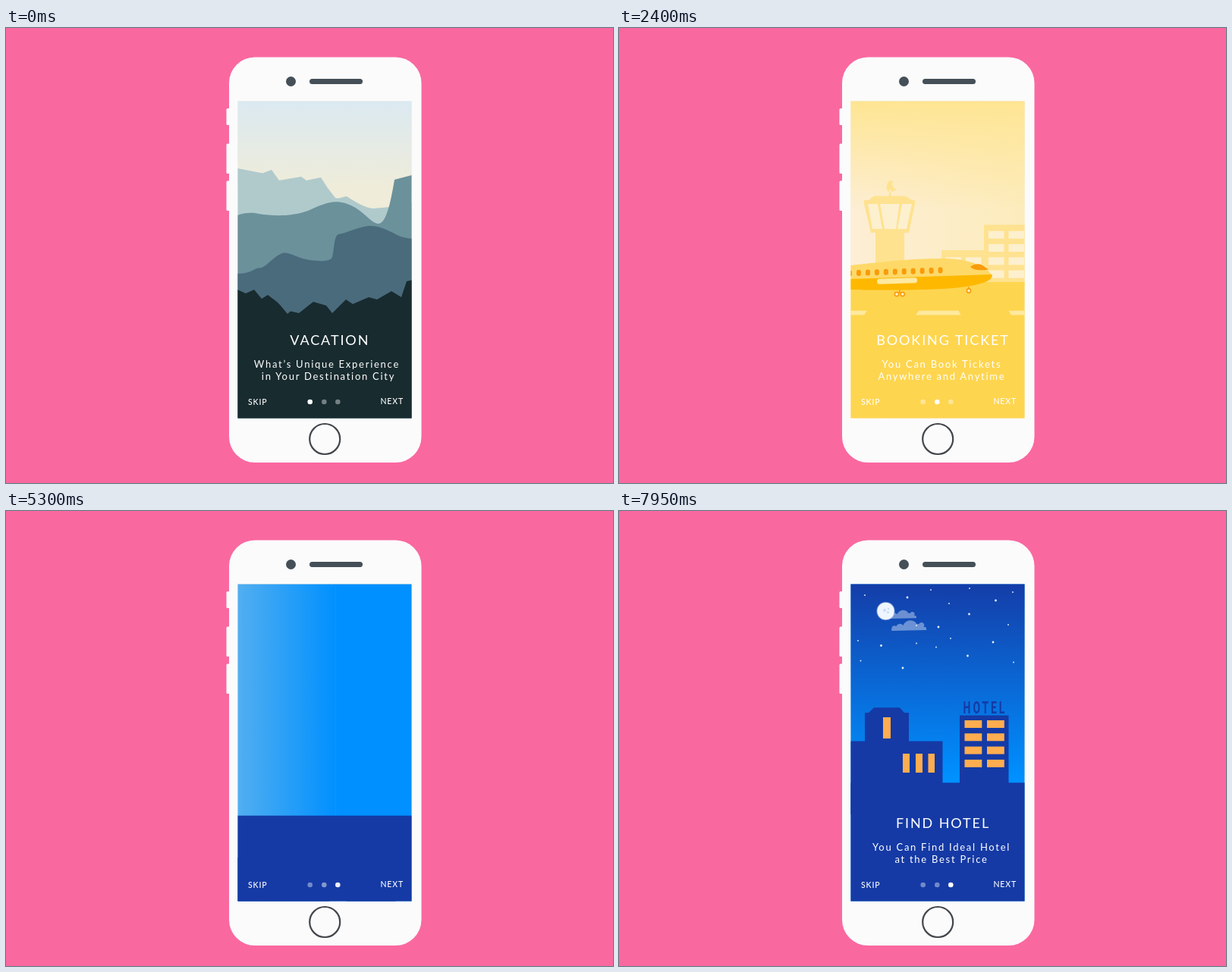
An HTML page for the animation above (8000 ms loop, 800 by 600 pixels).

```html
<!DOCTYPE html>
<html lang="en">
<head>
<meta charset="utf-8">
<title>Travel onboarding</title>
<style>
  html, body { margin: 0; width: 100%; height: 100%; overflow: hidden; background: #fa68a0; }
  svg { display: block; width: 800px; height: 600px; }
  text { font-family: Lato, "Open Sans", sans-serif; fill: #fff; }
  .title { font-size: 18px; letter-spacing: 1.9px; text-anchor: middle; }
  .sub { font-size: 13px; letter-spacing: 1.73px; text-anchor: middle; }
  .nav { font-size: 10.5px; font-weight: 500; letter-spacing: .85px; }
  .sign { font: 700 22.5px Roboto, sans-serif; letter-spacing: 4.75px; fill: #153aa5; }
</style>
</head>
<body>
<svg viewBox="0 0 800 600">
  <defs>
    <clipPath id="screen"><rect x="305.5" y="96.5" width="229" height="418"/></clipPath>
    <linearGradient id="dawn" x2="0" y2="1">
      <stop stop-color="#dbe9f1"/><stop offset="1" stop-color="#efecd9"/>
    </linearGradient>
    <linearGradient id="sand">
      <stop stop-color="#fdeed5" stop-opacity="0"/><stop offset=".57" stop-color="#fdeed5"/>
      <stop offset="1" stop-color="#fcecbc"/>
    </linearGradient>
    <linearGradient id="sun" x2="0" y2="1">
      <stop stop-color="#fee593"/><stop offset="1" stop-color="#fee593" stop-opacity="0"/>
    </linearGradient>
    <linearGradient id="azure">
      <stop stop-color="#0090ff" stop-opacity="0"/><stop offset="1" stop-color="#0090ff"/>
    </linearGradient>
    <linearGradient id="dusk" x2="0" y2="1">
      <stop stop-color="#143da8"/><stop offset="1" stop-color="#143da8" stop-opacity="0"/>
    </linearGradient>
    <path id="cloud" d="M0 14C-1 9 2 6 6 8C8 4 13 4 15 7C18-1 29-2 33 5L36 5C37 2 43 2 43 7L42 9L45 9L46 13Z"/>
  </defs>

  <rect width="800" height="600" fill="#fa68a0"/>
  <g fill="#fbfbfb">
    <rect x="290.5" y="106" width="8" height="22" rx="1.5"/>
    <rect x="290.5" y="152.5" width="8" height="39.5" rx="1.5"/>
    <rect x="290.5" y="201.5" width="8" height="39.5" rx="1.5"/>
    <rect x="294" y="38.5" width="253.5" height="534.5" rx="34"/>
  </g>
  <circle cx="375.5" cy="70.5" r="6.5" fill="#454f57"/>
  <rect x="400" y="67" width="70" height="7" rx="3.5" fill="#454f57"/>
  <circle cx="420.2" cy="542" r="20" fill="none" stroke="#42474c" stroke-width="2.2"/>

  <g clip-path="url(#screen)">
    <!-- skies -->
    <rect x="305" y="96" width="230" height="420" fill="#efecd9"/>
    <rect x="305" y="96" width="230" height="115" fill="url(#dawn)"/>
    <g id="sandSky">
      <rect y="96" width="535" height="420" fill="url(#sand)"/>
    </g>
    <rect id="sunTop" x="305" y="96" width="230" height="145" fill="url(#sun)"/>
    <g id="blueSky">
      <rect y="96" width="400" height="420" fill="url(#azure)"/>
      <rect x="399.5" y="96" width="300" height="420" fill="#0090ff"/>
    </g>
    <rect id="duskTop" x="305" y="96" width="230" height="255" fill="url(#dusk)"/>

    <!-- mountains -->
    <path id="ridge1" fill="#b0cacc" d="M305 185L338 191.5L350 187L360 201L389 196L396 201L415 197L424 211L434 224C440 226 444 222 449 222C460 229 475 238 484 238L506 236L535 230V600H305Z"/>
    <path id="ridge2" fill="#6b919b" d="M305 247C315 243 325 243 333 245C352 248 375 249 398 241C418 232 430 226 447 231C470 238 480 257 490 258C500 259 506 236 512 200L535 194V600H305Z"/>
    <path id="ridge3" fill="#4a6b7c" d="M305 324C320 324 325 319 332 316.5C342 318 350 303 362 298C372 293 380 303 400 306C415 308 428 308 430 302C433 290 432 275 438 272C450 270 455 266 468 263C485 258 495 263 510 270C520 276 528 277 535 278V600H305Z"/>
    <path id="ridge4" fill="#182b2f" d="M305 345L316 350L327 345L337 357L345 352L357 361L361 365L371 377L375 373.5L386 376L405 361L422 366L430 376L448 358L457 364L478 355L489 358L508 347L521 355L528 334L535 332.5V600H305Z"/>

    <!-- airport -->
    <g id="airport">
      <g id="tower" fill="#fee28f">
        <path d="M356 222V213H358.500V222ZM357 201C351 206 351 214 357 217L367 213C361 212 359 207 361 202Z"/>
        <path d="M323 227L329 227L336 221.500H378L386 227H390V232L382 270H332L323 232Z"/>
        <rect x="338" y="269" width="38" height="70"/>
        <path fill="#fdf0cf" d="M328 232H341L347 265H334ZM344 232H369.500L365 265H350ZM373 232H386L379 265H367Z"/>
      </g>
      <g id="terminal" fill="#fee28f">
        <rect x="425" y="293" width="57" height="50"/>
        <rect x="481" y="259.500" width="56" height="80"/>
        <g id="terminalGlass" fill="#fdf0cf"></g>
      </g>
      <rect x="305" y="335" width="230" height="300" fill="#fed54f"/>
      <path fill="#feea9e" d="M305 372.700H327L323 378.500H305ZM395.500 372.700H447.500L450.500 378.500H391ZM513.500 372.700H536V378.500H517Z"/>
    </g>
    <g id="plane">
      <path fill="#fed968" d="M180 320L305 313C340 309 385 304 425 304C455 304 470 310 480 316C488 321 492 325 492 328L440 336H180Z"/>
      <path fill="#feb800" d="M180 333L305 331L491.500 325C494 335 470 340 440 343C400 346 340 346 305 345L180 343Z"/>
      <path fill="#f99c0a" d="M463 315C467 311 475 310 479 313L487 318.500C478 320 468 320 463 315Z"/>
      <g id="portholes" fill="#f99c0a"></g>
      <rect x="340" y="330" width="53" height="7" rx="3.300" fill="#fee9a0" transform="rotate(-1.700 366 333)"/>
      <path stroke="#f99c0a" stroke-width="1.500" d="M370 345V350M461 341V346"/>
      <g fill="#fff3d0" stroke="#f99c0a" stroke-width="1.600">
        <circle cx="366" cy="351" r="2.600"/><circle cx="373.700" cy="351" r="2.600"/><circle cx="461" cy="346.500" r="2.600"/>
      </g>
    </g>

    <!-- night city -->
    <g id="stars" fill="#fff"></g>
    <use id="cloudA" href="#cloud" y="144" fill="#fff" fill-opacity=".38"/>
    <g id="cloudB"><use href="#cloud" transform="translate(0 130.500) scale(.83)" fill="#fff" fill-opacity=".38"/></g>
    <g id="moon">
      <circle cx="351.500" cy="132" r="12.200" fill="#fff" opacity=".35"/>
      <circle cx="351.500" cy="132" r="11.200" fill="#f0f6ff"/>
      <g fill="#c6ddfa"><circle cx="350" cy="131" r="2"/><circle cx="355" cy="129" r="1.300"/><circle cx="354.500" cy="133.500" r="1.600"/></g>
    </g>
    <g id="city" fill="#153aa5">
      <g id="block">
        <path d="M300 303.500H324V266H329L336 259.300H370L376 266H382V303.500H426.500V400H300Z"/>
        <path fill="#ffad4f" d="M348 272H358V300H348ZM374 320H383V345H374ZM391 320H400V345H391ZM407.500 320H416V345H407.500Z"/>
      </g>
      <g id="hotel">
        <text class="sign" transform="translate(453.600 267) scale(.62 1)">HOTEL</text>
        <rect x="449" y="269.500" width="64.500" height="130"/>
        <g id="hotelGlass" fill="#ffad4f"></g>
      </g>
      <rect x="305" y="358.300" width="230" height="300"/>
    </g>

    <!-- copy -->
    <g id="title1"><text class="title" x="426.800" y="417.500">VACATION</text></g>
    <g id="sub1"><text class="sub" x="422.900" y="448">What’s Unique Experience</text><text class="sub" x="425" y="463.700">in Your Destination City</text></g>
    <g id="title2"><text class="title" x="427" y="417.500">BOOKING TICKET</text></g>
    <g id="sub2"><text class="sub" x="425.400" y="448">You Can Book Tickets</text><text class="sub" x="425.400" y="463.700">Anywhere and Anytime</text></g>
    <g id="title3"><text class="title" x="427" y="417.500">FIND HOTEL</text></g>
    <g id="sub3"><text class="sub" x="425" y="448">You Can Find Ideal Hotel</text><text class="sub" x="425" y="463.700">at the Best Price</text></g>

    <text class="nav" x="319" y="496.900">SKIP</text>
    <text class="nav" x="493.400" y="496.300">NEXT</text>
    <g fill="#fff">
      <circle id="dot1" cx="400.700" cy="493" r="3.300"/>
      <circle id="dot2" cx="419.300" cy="493" r="3.300"/>
      <circle id="dot3" cx="437.300" cy="493" r="3.300"/>
    </g>
  </g>
</svg>

<script>
const LOOP = 8000, STEP = 50;
const $ = id => document.getElementById(id);

function add(parent, tag, attrs) {
  const el = document.createElementNS('http://www.w3.org/2000/svg', tag);
  for (const k in attrs) el.setAttribute(k, attrs[k]);
  return $(parent).appendChild(el);
}

function glass(parent, cols, top, rows, width) {
  for (const x of cols)
    for (let r = 0; r < rows; r++)
      add(parent, 'rect', { x, y: top + r * 17.3, width, height: 10 });
}
glass('terminalGlass', [487, 513.5], 267.7, 4, 20.5);
glass('terminalGlass', [430.5, 457], 302.3, 2, 20.5);
glass('hotelGlass', [455.5, 485], 276, 4, 22.8);

for (let i = -9; i < 10; i++)
  add('portholes', 'rect', { x: 313 + i * 11.95, y: 319 - i * .39, width: 6, height: 8, rx: 2.4 });

// x, y, large
const stars = [
  [324, 111], [380, 114, 1], [411, 104], [462, 102], [496.5, 118, 1], [519, 107], [435, 122],
  [461.5, 136, 1], [513, 150], [392, 151], [421, 153, 1], [437, 168], [315, 171], [345.5, 177.5, 1],
  [392, 174.5], [418, 179.5], [459.5, 191, 1], [493, 173, 1], [318.5, 197.5], [374, 207, 1], [520, 199.5]
].map(([cx, cy, big]) => add('stars', 'circle', { cx, cy, r: big ? 1.4 : .9 }));

const ease = {
  lin: u => u,
  in: u => u * u,
  quad: u => 1 - (1 - u) ** 2,
  out: u => 1 - (1 - u) ** 3,
  quint: u => 1 - (1 - u) ** 5,
  both: u => u < .5 ? 4 * u ** 3 : 1 - (2 - 2 * u) ** 3 / 2
};

// property, start, end, from, to, easing
const tracks = {
  title1: [['y', 50, 350, 0, 60, 'in'], ['o', 50, 300, 1, 0, 'lin']],
  sub1: [['y', 50, 300, 0, 50, 'in'], ['o', 50, 250, 1, 0, 'lin']],
  ridge4: [['y', 50, 600, 0, 190, 'both']],
  ridge3: [['y', 100, 680, 0, 265, 'both']],
  ridge2: [['y', 150, 760, 0, 330, 'both']],
  ridge1: [['y', 200, 840, 0, 340, 'both']],
  sandSky: [['x', 300, 1000, 535, 0, 'lin']],
  sunTop: [['y', 1400, 2400, -145, 0, 'lin'], ['y', 3550, 4500, 0, -137, 'both']],
  airport: [['y', 550, 1050, 185, 0, 'out'], ['y', 4100, 5000, 0, 181, 'both']],
  tower: [['y', 750, 1300, 145, 0, 'out'], ['y', 3750, 4350, 0, 145, 'in']],
  terminal: [['y', 850, 1400, 85, 0, 'out'], ['y', 3850, 4400, 0, 85, 'in']],
  plane: [['x', 800, 2200, -200, 0, 'quint'], ['x', 3550, 4350, 0, 360, 'in']],
  title2: [['y', 1280, 1900, 110, 0, 'quad'], ['o', 1280, 1900, 0, 1, 'lin'],
           ['y', 3600, 4000, 0, 60, 'in'], ['o', 3600, 3950, 1, 0, 'lin']],
  sub2: [['y', 1750, 2250, 25, 0, 'out'], ['o', 1750, 2400, 0, 1, 'lin'],
         ['y', 3550, 3900, 0, 50, 'in'], ['o', 3550, 3850, 1, 0, 'lin']],
  blueSky: [['x', 4695, 5457, 535, -95, 'lin']],
  duskTop: [['y', 5300, 6600, -255, 0, 'both']],
  city: [['y', 4950, 5950, 158, 0, 'out']],
  block: [['y', 5500, 6250, 110, 0, 'out']],
  hotel: [['y', 5700, 6450, 125, 0, 'out']],
  moon: [['y', 5750, 6450, 40, 0, 'out'], ['o', 5750, 6300, 0, 1, 'lin']],
  cloudA: [['x', 5700, 8000, 258, 359.5, 'quad']],
  cloudB: [['x', 5700, 8000, 536, 350, 'lin']],
  title3: [['y', 6850, 7470, 110, 0, 'quad'], ['o', 6850, 7470, 0, 1, 'lin']],
  sub3: [['y', 7300, 7800, 25, 0, 'out'], ['o', 7300, 7950, 0, 1, 'lin']],
  dot1: [['o', 500, 850, 1, .4, 'lin']],
  dot2: [['o', 500, 850, .4, 1, 'lin'], ['o', 4950, 5350, 1, .4, 'lin']],
  dot3: [['o', 4950, 5350, .4, 1, 'lin']]
};

const ramp = (t, a, b) => Math.min(1, Math.max(0, (t - a) / (b - a)));

function value(track, prop, t, rest) {
  const segs = track.filter(s => s[0] === prop);
  if (!segs.length) return rest;
  const [, a, b, from, to, fn] = segs.filter(s => t >= s[1]).pop() || segs[0];
  return from + (to - from) * ease[fn](ramp(t, a, b));
}

function draw(t) {
  for (const id in tracks) {
    const el = $(id), track = tracks[id];
    el.setAttribute('transform', `translate(${value(track, 'x', t, 0)} ${value(track, 'y', t, 0)})`);
    el.setAttribute('opacity', value(track, 'o', t, 1));
  }
  stars.forEach((s, i) => {
    const start = 6900 + (i * 8 % stars.length) * 25;
    s.setAttribute('opacity', ramp(t, start, start + 300) * .9);
  });
}

const born = performance.now();
function tick() {
  const t = (performance.now() - born) % LOOP;
  draw(Math.floor(t / STEP) * STEP);
  requestAnimationFrame(tick);
}
tick();
</script>
</body>
</html>
```
